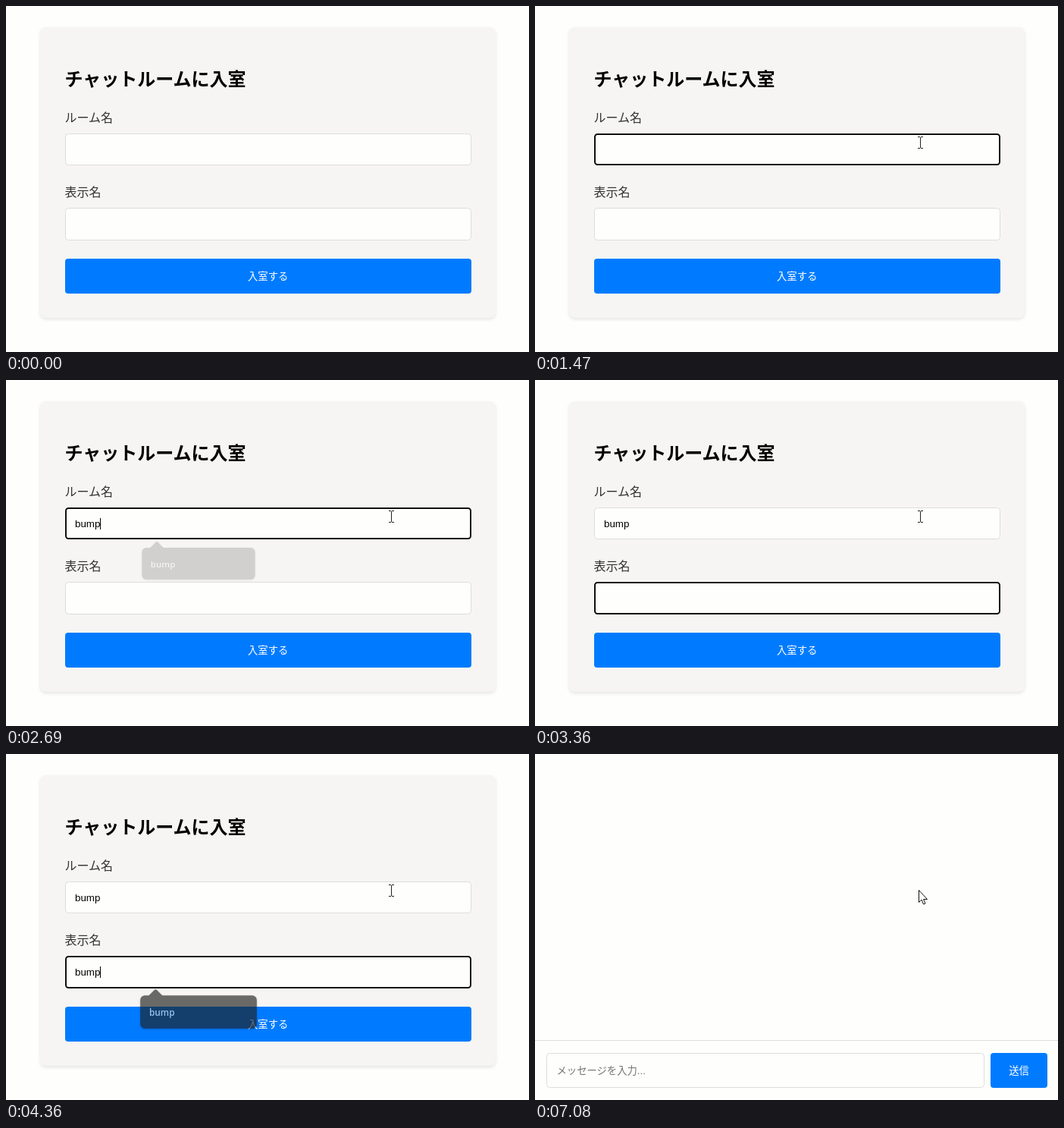
These frames come from a looping animation (690x456 px, 8 s). An HTML page:

```html
<!DOCTYPE html>
<html lang="ja">
<head>
<meta charset="utf-8">
<title>チャットルーム</title>
<style>
html, body { margin: 0; width: 100%; height: 100%; overflow: hidden; background: #fefefd; }
svg { display: block; width: 690px; height: 456px; }
text { font-family: "Liberation Sans", "Noto Sans CJK JP", "Noto Sans CJK", sans-serif; font-size: 13.333px; }
.cjk { font-family: "Noto Sans CJK JP", "Noto Sans CJK", sans-serif; }
.title { font-size: 24px; font-weight: 700; }
.label { font-size: 16px; fill: #333; }
.card { fill: #f6f5f3; filter: drop-shadow(0 2px 2px rgba(0, 0, 0, .1)); }
.box { fill: #fefefd; stroke: #ddd; }
.ring { fill: #fefefd; stroke: #101010; stroke-width: 2; }
.button { fill: #007bff; }
.onButton { fill: #fff; text-anchor: middle; }
.bubble { fill: #1f1f1f; filter: drop-shadow(0 1px 1.5px rgba(0, 0, 0, .35)); }
.hint { font: 600 12px "Open Sans", "Noto Sans", sans-serif; fill: #e6e6e6; }
</style>
</head>
<body>
<svg viewBox="0 0 690 456">
  <rect width="690" height="456" fill="#fefefd"/>
  <g id="entry">
    <rect class="card" x="45" y="28" width="601" height="383" rx="8"/>
    <text class="cjk title" x="77.5" y="105">チャットルームに入室</text>
    <text class="cjk label" x="77.5" y="153">ルーム名</text>
    <text class="cjk label" x="77.5" y="251">表示名</text>
    <rect class="button" x="78" y="333" width="536" height="46" rx="4"/>
    <text class="cjk onButton" x="345.7" y="360.5">入室する</text>
    <g id="fields"></g>
    <g id="popup">
      <path class="bubble" d="M182 220H187.5L195 212.5Q196.500 211 198 212.500L205.500 220H326a6 6 0 0 1 6 6V258a6 6 0 0 1-6 6H182a6 6 0 0 1-6-6V226a6 6 0 0 1 6-6z"/>
      <text class="hint" x="188" y="247">bump</text>
    </g>
  </g>
  <g id="chat">
    <rect y="377" width="690" height="1" fill="#ddd"/>
    <rect class="box" x="15.5" y="394.5" width="577" height="45" rx="4"/>
    <text x="28.500" y="422" fill="#757575">メッセージを入力...</text>
    <rect class="button" x="601" y="394" width="75" height="46" rx="4"/>
    <text class="cjk onButton" x="638.5" y="422">送信</text>
  </g>
  <circle id="click" cx="506" cy="180" r="12" fill="#ff0" fill-opacity=".52"/>
  <g id="cursor">
    <path id="arrow" d="M-1.500-.5V15.500L2 12 4.500 18 7 17 4.500 11.500H9.500Z" fill="#fff" stroke="#111" stroke-linejoin="round"/>
    <path id="beam" d="M-3-7.500H0M1-7.500H4M.5-7V7M-3 7.500H0M1 7.500H4" fill="none" stroke="#222"/>
  </g>
</svg>
<script>
const LOOP = 8000, WORD = 'bump';
const $ = id => document.getElementById(id);
const show = (el, on) => el.setAttribute('display', on ? 'inline' : 'none');

function make(tag, attrs) {
  const el = document.createElementNS('http://www.w3.org/2000/svg', tag);
  for (const k in attrs) el.setAttribute(k, attrs[k]);
  return $('fields').appendChild(el);
}

// keys: typing times; blink: caret toggles; fade: when the popup starts to close
function field(top, height, spec) {
  return {
    ...spec, top, height,
    box: make('rect', { class: 'box', x: 78.5, y: top + .5, width: 535, height: height - 1, rx: 4 }),
    ring: make('rect', { class: 'ring', x: 79, y: top + 1, width: 534, height: height - 2, rx: 3.5 }),
    text: make('text', { x: 91, y: top + 26 }),
    caret: make('rect', { x: 91, y: top + 14, width: 1, height: 15 })
  };
}

const fields = [
  field(168, 42, { focus: 950, blur: 2810, keys: [1740, 1880, 2480, 2550], blink: [1470, 1740], open: 1740, fade: 2620 }),
  field(266, 43, { focus: 2810, blur: 7080, keys: [3820, 4020, 4110, 4240],
    blink: [3360, 3820, 4770, 5300, 5830, 6360], open: 3890, fade: 4310 })
];

const passed = (times, t) => times.filter(x => t >= x).length;

function drawField(f, t) {
  const focused = t >= f.focus && t < f.blur;
  const typed = WORD.slice(0, passed(f.keys, t));
  show(f.box, !focused);
  show(f.ring, focused);
  if (f.text.textContent !== typed) f.text.textContent = typed;
  const width = typed ? f.text.getComputedTextLength() : 0;
  f.caret.setAttribute('x', Math.floor(91 + width));
  show(f.caret, focused && passed(f.blink, t) % 2 === 0);
}

function drawPopup(t) {
  const f = fields.find(f => t >= f.open && t < f.fade + 130);
  show($('popup'), f);
  if (!f) return;
  const step = passed([f.fade, f.fade + 65], t);
  const scale = [1, .985, .957][step];
  $('popup').setAttribute('opacity', [1, .65, .17][step]);
  $('popup').setAttribute('transform',
    `translate(254 ${f.top - 168 + 242}) scale(${scale}) translate(-254 -242)`);
}

function drawCursor(t) {
  // the pointer is sampled in eleven hops
  const p = Math.min(10, Math.floor((t - 150) / 66)) / 10;
  const e = p * p * (3 - 2 * p);
  const x = Math.round(650 - 142 * e), y = Math.round(438 - 258 * e);
  const overField = fields.some(f => y >= f.top && y < f.top + f.height && x < 614);
  const beam = overField && t < 6750;
  show($('cursor'), t >= 150);
  $('cursor').setAttribute('transform', `translate(${x} ${y})`);
  show($('beam'), beam);
  show($('arrow'), !beam);
  show($('click'), t >= 950 && t < 1010);
}

function draw(t) {
  show($('entry'), t < 7080);
  show($('chat'), t >= 7080);
  fields.forEach(f => drawField(f, t));
  drawPopup(t);
  drawCursor(t);
}

const start = performance.now();
function tick() {
  draw((performance.now() - start) % LOOP);
  requestAnimationFrame(tick);
}
tick();
</script>
</body>
</html>
```
